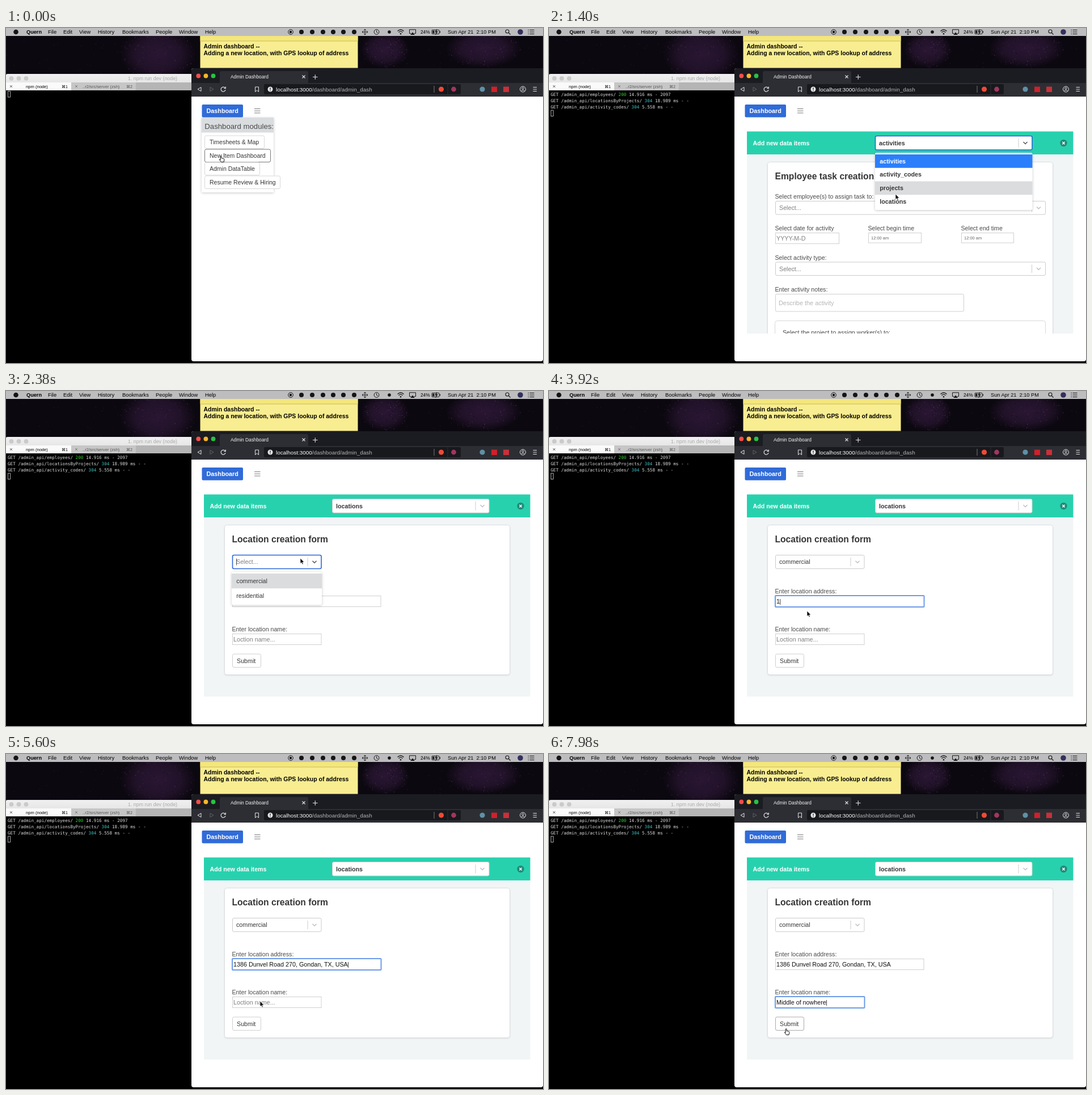
An HTML page for the animation above (8000 ms loop, 947x591 px).

```html
<!DOCTYPE html>
<html lang="en">
<head>
<meta charset="utf-8">
<title>Admin dashboard</title>
<style>
html, body { margin: 0; width: 100%; height: 100%; overflow: hidden; background: #000; }
svg { display: block; width: 947px; height: 591px; font-family: "Liberation Sans", Arial, sans-serif; }
.mono { font-family: "DejaVu Sans Mono", monospace; }
.b { font-weight: bold; }
.shade { filter: drop-shadow(0 1px 2px rgba(0,0,0,.22)); }
.soft { filter: drop-shadow(0 1px 1px rgba(0,0,0,.1)); }
</style>
</head>
<body>
<svg viewBox="0 0 947 591">
  <defs>
    <linearGradient id="bar" x2="0" y2="1"><stop stop-color="#f0f0f0"/><stop offset="1" stop-color="#dedede"/></linearGradient>
    <radialGradient id="haze"><stop stop-color="#2a1633"/><stop offset=".6" stop-color="#2a1633" stop-opacity=".7"/><stop offset="1" stop-color="#2a1633" stop-opacity="0"/></radialGradient>
    <clipPath id="sky"><path d="M0 14H947V71H621V82H0z"/></clipPath>
    <clipPath id="panel"><path d="M349 182H925V539H349z"/></clipPath>
  </defs>
  <g id="base"></g>
  <g id="live"></g>
</svg>
<script>
const STEP = 140, LOOP = 8000;
const INK = '#4a4a4a', DARK = '#363636', LINE = '#d3d3d3', BLUE = '#2a66d9';

const rect = (x, y, w, h, fill, more = '') =>
  `<rect x="${x}" y="${y}" width="${w}" height="${h}" fill="${fill}" ${more}/>`;
const text = (x, y, s, size = 10.65, fill = INK, cls = '') =>
  `<text x="${x}" y="${y}" font-size="${size}" fill="${fill}" class="${cls}">${s}</text>`;
const dot = (x, y, r, fill, more = '') => `<circle cx="${x}" cy="${y}" r="${r}" fill="${fill}" ${more}/>`;
const line = (d, color, w = 1, fill = 'none') => `<path d="${d}" fill="${fill}" stroke="${color}" stroke-width="${w}"/>`;
const frame = (x, y, w, h, stroke = LINE, r = 2.5, sw = 1) =>
  rect(x + .5, y + .5, w - 1, h - 1, '#fff', `rx="${r}" stroke="${stroke}" stroke-width="${sw}"`);

function sky() {
  let seed = 7;
  const rnd = () => (seed = seed * 16807 % 2147483647) / 2147483647;
  const clouds = [[268, 46, 66, 48], [668, 38, 42, 32], [842, 36, 66, 34]];
  let out = rect(0, 0, 947, 591, '#0c0810');
  for (const [x, y, w, h] of clouds)
    out += `<ellipse cx="${x}" cy="${y}" rx="${w}" ry="${h}" fill="url(#haze)"/>`;
  for (let i = 0; i < 480; i++) {
    const [cx, cy, w, h] = clouds[i % 3], a = rnd() * 6.283, d = Math.sqrt(rnd());
    const x = cx + Math.cos(a) * d * w, y = cy + Math.sin(a) * d * h;
    out += dot(x.toFixed(1), y.toFixed(1), (.4 + rnd() * .4).toFixed(2), ['#3d2248', '#2e193a', '#4c2f56', '#0e0812'][i % 4]);
  }
  for (let i = 0; i < 90; i++)
    out += dot((rnd() * 947).toFixed(1), (14 + rnd() * 68).toFixed(1), .5, '#33243d');
  return `<g clip-path="url(#sky)">${out}</g>`;
}

function menuBar() {
  const k = '#151515';
  let out = rect(0, 0, 947, 14, '#bdbdbf') + dot(17.5, 7, 4.3, k) + text(36, 10.4, 'Quern', 9.2, '#000', 'b');
  const items = { File: 74, Edit: 101, View: 129, History: 162, Bookmarks: 205, People: 264, Window: 305, Help: 351 };
  for (const name in items) out += text(items[name], 10.4, name, 9.4, '#000');
  out += dot(502, 7, 4.3, 'none', `stroke="${k}"`) + dot(502, 7, 2.2, k);
  for (const x of [521, 540, 559, 577, 595, 614, 676]) out += dot(x, 7, x == 676 ? 2.8 : 4, k);
  out += line('M633 2V12M628 7H638M631 4L633 2 635 4M631 10L633 12 635 10M630 5L628 7 630 9M636 5L638 7 636 9', k, .9);
  out += dot(653.5, 7, 4.4, 'none', `stroke="${k}"`) + line('M653.5 4V7.3L656 8.5', k, .9);
  out += line('M690.5 5.5Q696 .5 701.5 5.5M692.5 7.7Q696 4.5 699.5 7.7', k, 1.3) + dot(696, 10.2, 1.3, k);
  out += line('M714 9.5H711.5V2.8H722.5V9.5H720', k) + line('M717 7.5L721 12H713z', k, 0, k);
  out += text(731, 10.2, '24%', 8.3, '#000') + rect(751, 3.5, 13, 7, 'none', `rx="1" stroke="${k}" stroke-width=".9"`);
  out += rect(752.2, 4.7, 3.2, 4.6, k) + rect(764.8, 5.5, 1.2, 3, k) + line('M759.5 2L756.5 7.5H759L757.5 12 761.5 6H759z', k, .4, k);
  out += text(779, 10.4, 'Sun Apr 21\u00a0 2:10 PM', 9.2, '#000');
  out += dot(884, 6, 3, 'none', `stroke="${k}" stroke-width="1.1"`) + line('M886.3 8.3L889.5 11.5', k, 1.2);
  out += dot(907, 7, 4.8, '#34305c');
  return out + line('M920.5 3.5H922M920.5 7H922M920.5 10.5H922M923.5 3.5H931.5M923.5 7H931.5M923.5 10.5H931.5', k, 1.2);
}

const note = () => rect(342.5, 14, 278, 56.5, '#f8ed90') + rect(342.5, 14, 278, 9, '#f4e67a') + rect(342.5, 22.5, 278, 1, '#cabd62')
  + text(348.5, 36, 'Admin dashboard --', 10.47, '#000', 'b')
  + text(348.5, 48.3, 'Adding a new location, with GPS lookup of address', 10.47, '#000', 'b');

function terminal() {
  let out = rect(0, 110, 327, 481, '#000') + line('M0 110V83Q0 81 3 81H327V110z', 'none', 0, 'url(#bar)');
  for (const x of [9.5, 22.5, 35.5]) out += dot(x, 88.8, 3.9, '#cacaca');
  out += text(215, 92, '1. npm run dev (node)', 8.85, '#a9a9a9');
  out += rect(0, 96, 115, 14, '#fafafa') + rect(115, 96, 114, 14, '#c6c6c6') + rect(229, 96, 98, 14, '#b5b5b5');
  out += line('M7 101L11 105M11 101L7 105', '#555', .9) + line('M122 101L126 105M126 101L122 105', '#777', .9);
  return out + text(35, 105.6, 'npm (node)', 7.6, '#000') + text(98, 105.6, '⌘1', 7, '#000')
    + text(135, 105.6, '..r2/src/server (zsh)', 7.6, '#555') + text(212, 105.6, '⌘2', 7, '#555');
}

function browser() {
  const w = '#e4e4e6';
  let out = rect(327, 71, 620, 517, '#fff', 'rx="4"') + line('M327 121V75Q327 71 331 71H947V121z', 'none', 0, '#1b1c21');
  out += rect(327, 97, 620, 24, '#2d2e33') + line('M377 97V79Q377 76 380 76H530Q533 76 533 79V97z', 'none', 0, '#2d2e33');
  ['#fa4d48', '#f8b62c', '#27c440'].forEach((c, i) => out += dot(339.3 + i * 13.1, 84.5, 3.9, c));
  out += text(396, 89.4, 'Admin Dashboard', 8.35, '#f4f4f4');
  out += line('M522.5 83.5L527.5 88.5M527.5 83.5L522.5 88.5M541 86.5H549.5M545.25 82.25V90.75', w, 1.1);
  out += line('M344 104.5L338 108 344 111.5z', w, 1) + line('M360 104.5L366 108 360 111.5z', '#606167', 1);
  out += line('M386.3 105.7A4 4 0 1 0 387 109M387.3 103.5V106.5H384.3', w, 1.2);
  out += line('M439.5 104H445.5V112.5L442.5 110 439.5 112.5z', w, 1);
  out += rect(455, 99, 347, 18, '#18191d', 'rx="2"') + dot(466, 108, 4.5, w) + rect(465.4, 105.2, 1.2, 3.5, '#18191d') + rect(465.4, 109.7, 1.2, 1.2, '#18191d');
  out += text(476, 111.5, 'localhost:3000<tspan fill="#b4b5b8">/dashboard/admin_dash</tspan>', 9.9, '#fff');
  out += rect(754.5, 102, 1, 12, '#77787c') + rect(778.5, 99, 1, 18, '#2d2e33');
  out += dot(767.5, 108, 4.6, '#ef4a36') + dot(789.5, 108, 4.4, '#a1365f');
  out += dot(840, 108, 4.6, '#5f91a6') + rect(856, 103.5, 10, 9.5, '#d0202b') + rect(877, 103.5, 10, 9.5, '#c9303a');
  out += dot(911.5, 108, 5, 'none', `stroke="${w}"`) + dot(911.5, 106.6, 1.7, 'none', `stroke="${w}"`) + line('M908 111.5Q911.5 108 915 111.5', w);
  out += line('M929.5 104.5H936M929.5 108H936M929.5 111.5H936', w, 1.2);
  out += rect(345.5, 135, 72.5, 22.5, '#306bd8', 'rx="2"') + text(353.5, 150.3, 'Dashboard', 10.8, '#fff', 'b');
  return out + line('M438 142.5H448.5M438 146.2H448.5M438 149.9H448.5', '#777', 1);
}

function modules() {
  const items = [['Timesheets &amp; Map', 106], ['New Item Dashboard', 117], ['Admin DataTable', 98], ['Resume Review &amp; Hiring', 134]];
  let out = rect(345, 158, 127, 132, '#fff', 'class="shade"') + rect(345, 158, 127, 26.5, '#dadddf');
  out += text(350.3, 177.8, 'Dashboard modules:', 13.2);
  items.forEach(([s, w], i) => {
    const y = Math.round(190 + i * 23.7) - .5;
    out += frame(350, y, w, 23.5, i == 1 ? '#777' : '#d8d8d8') + text(359, y + 15.6, s, 10.5, DARK);
  });
  return out;
}

function select(x, y, w, h, label, { focus, color = DARK, cls = '', caret } = {}) {
  const cx = x + w - 12.5, cy = y + h / 2;
  let out = frame(x, y, w, h, focus ? BLUE : '#cbcbcb', 2.5, focus ? 1.6 : 1);
  out += text(x + 7, cy + 3.8, label, 10.7, color, cls) + rect(x + w - 25, y + 5, 1, h - 10, '#ccc');
  if (caret) out += rect(x + 7, cy - 6, .8, 12, '#222');
  return out + line(`M${cx - 3.5} ${cy - 1.7}l3.5 3.4 3.5-3.4`, focus ? '#555' : '#c0c0c0', 1.5);
}

function menu(x, y, w, rowH, items, hover, chosen, cls = '') {
  let out = rect(x, y, w, rowH * items.length + 6, '#fff', 'rx="2.5" class="shade"');
  items.forEach((s, i) => {
    const top = y + 3 + i * rowH, on = i === chosen;
    if (on || i === hover) out += rect(x, top, w, rowH, on ? '#2b7ffb' : '#dadcde');
    out += text(x + 8.3, top + rowH / 2 + 3.8, s, 10.7, on ? '#fff' : DARK, cls);
  });
  return out;
}

function input(x, y, w, h, value, { focus, color = '#111', size = 10.75, pad = 2 } = {}) {
  let out = focus ? rect(x, y, w, h, '#fff', 'rx="1" stroke="#6c9be8" stroke-width="2"') : frame(x, y, w, h, '#d0d0d0', 0);
  out += `<text x="${x + pad}" y="${y + h / 2 + size * .35}" font-size="${size}" fill="${color}">${value}`;
  return out + (focus ? '<tspan fill="#222" dx="-.8">|</tspan>' : '') + '</text>';
}

const card = h => rect(385.5, 236.5, 503, h, '#fff', 'rx="4" stroke="#dcdfe1" class="soft"');

function employeeForm() {
  const hint = { color: '#808080' }, small = { color: '#666', size: 7.5, pad: 5 };
  return card(400) + text(398.5, 267, 'Employee task creation form', 15.65, DARK, 'b')
    + text(398.5, 301, 'Select employee(s) to assign task to:') + select(399, 305, 477, 24.5, 'Select...', hint)
    + text(398.5, 357, 'Select date for activity') + text(562.5, 357, 'Select begin time') + text(726.5, 357, 'Select end time')
    + input(399, 361, 113, 20, 'YYYY-M-D', hint) + input(563, 361, 94, 18.5, '12:00 am', small) + input(727, 361, 93, 18.5, '12:00 am', small)
    + text(398.5, 408.5, 'Select activity type:') + select(399, 412.5, 477, 24.5, 'Select...', hint)
    + text(398.5, 465, 'Enter activity notes:') + frame(399, 469, 333, 31.5, '#cfcfcf', 2) + text(405, 488.6, 'Describe the activity', 10.9, '#b5b5b5')
    + frame(398, 516, 478, 90, '#d8d8d8', 4) + text(412, 540.5, 'Select the project to assign worker(s) to:');
}

const ADDRESSES = ['1386 Dunvel Road 270, Gondan, TX, USA', '1925 Dunvel Road 268, Gondan, TX, USA',
  '1170 Tall Willows Grove Road, Gondan, TX, USA', '1562 Flittering Field Road, Rio Telo, TX, USA', '184 Fable Hill Road, Mardon, TX, USA'];

function placeName(t) {
  if (t <= 6580) return 'Middle'.slice(0, Math.max(0, (t - 5880) / STEP + 1));
  return 'Middle' + ' of nowhere'.slice(0, Math.round(11 * (t - 6580) / (8 * STEP)));
}

function locationForm(t, y) {
  const chosen = t >= 2800, list = t >= 4200 && t < 5040, open = t >= 2240 && !chosen;
  const drop = list ? 79 : 0, name = placeName(t), naming = t >= 5740;
  let out = card(264 + drop) + text(398.5, 267, 'Location creation form', 15.65, DARK, 'b');
  out += select(399, 289, 157.5, 25, chosen ? 'commercial' : 'Select...',
    { focus: t >= 2240 && t < 3360, color: chosen ? DARK : '#808080', caret: open });
  out += text(398.5, 357, 'Enter location address:');
  out += input(399, 361, 262.5, 20, t >= 5040 ? ADDRESSES[0] : t >= 3780 ? '1' : '', { focus: t >= 3360 && t < 5740 });
  if (list) ADDRESSES.forEach((s, i) => out += text(398.5, 393 + i * 15.75, s));
  out += text(398.5, 424.3 + drop, 'Enter location name:');
  out += input(399, 428 + drop, 157.5, 20, name || (naming ? '' : 'Loction name...'), { focus: naming, color: name ? '#111' : '#808080' });
  out += frame(399, 463.5 + drop, 51, 24.5, t >= 7840 ? '#aaa' : '#d0d0d0') + text(407, 479.5 + drop, 'Submit', 10.7, DARK);
  if (open) out += menu(398, 319, 159, 26.2, ['commercial', 'residential'], Math.max(0, Math.floor((y - 322) / 26.2)));
  return out;
}

function panel(t, y) {
  const picked = t >= 1820, open = t >= 1120 && !picked;
  let out = rect(349, 223, 575.5, 316, '#f2f5f6') + (picked ? locationForm(t, y) : employeeForm());
  out += rect(349, 182.5, 575.5, 40.5, '#28d1ae') + text(359.5, 206.8, 'Add new data items', 10.65, '#fff', 'b');
  out += select(575, 190, 277.5, 25.5, picked ? 'locations' : 'activities', { focus: t >= 1120 && t < 2240, cls: 'b' });
  out += dot(907.5, 203, 6.2, '#208a78') + line('M905.3 200.8L909.7 205.2M909.7 200.8L905.3 205.2', '#fff', 1.5);
  if (open) out += menu(575, 220, 277.5, 23.75, ['activities', 'activity_codes', 'projects', 'locations'], Math.floor((y - 223) / 23.75), 0, 'b');
  return `<g clip-path="url(#panel)">${out}</g>`;
}

function log(t) {
  const rows = [['employees', '#2fd52f', 200, '14.916 ms - 2097'], ['locationsByProjects', '#3cc5c5', 304, '18.989 ms - -'], ['activity_codes', '#3cc5c5', 304, '5.558 ms - -']];
  const count = t < 560 ? 0 : t < 700 ? 1 : 3;
  let out = '';
  rows.slice(0, count).forEach(([path, color, code, rest], i) =>
    out += text(3, 120 + i * 11.2, `GET /admin_api/${path}/ <tspan fill="${color}">${code}</tspan> ${rest}`, 7.65, '#dcdcdc', 'mono'));
  return out + rect(3.5, 111.5 + count * 11.2, 4, 10.5, 'none', 'stroke="#bbb" stroke-width=".9"');
}

// time, x, y, pointer: 0 arrow, 1 hand, 2 hidden
const PATH = [[0, 381, 231, 1], [420, 381, 231, 0], [980, 690, 204, 0], [1120, 690, 204, 0], [1400, 611, 293, 0], [1540, 611, 302, 0],
  [1820, 611, 302, 0], [2240, 519, 295, 0], [2380, 519, 295, 0], [2660, 460, 334, 0], [2800, 460, 334, 0], [3220, 456, 370, 0],
  [3360, 456, 370, 0], [3640, 455, 388, 0], [4340, 455, 388, 1], [4620, 452, 397, 1], [5040, 452, 397, 0], [5180, 452, 397, 0],
  [5600, 448, 436, 0], [5880, 448, 436, 2], [7840, 432, 474, 1], [7980, 420, 490, 1]];

function pointer(t) {
  let i = PATH.length - 1;
  while (PATH[i][0] > t) i--;
  const a = PATH[i], b = PATH[i + 1] || a, u = (t - a[0]) / (b[0] - a[0] || 1), e = u * u * (3 - 2 * u);
  return { x: a[1] + (b[1] - a[1]) * e, y: a[2] + (b[2] - a[2]) * e, kind: a[3] };
}

function cursor({ x, y, kind }) {
  if (kind == 2) return '';
  const shape = kind
    ? line('M-2.8-4.8q1-1.2 2 0V-1.4l3.6.8q1.4.5 1.1 2L3 5.5H-1.4L-4.6 1.2q-.2-1.4 1.8.2z', '#111', 1, '#fff')
    : line('M0 0V9.5L2.2 7.6 3.7 11 5.3 10.3 3.8 7H6.8z', '#fff', .7, '#000');
  return `<g transform="translate(${x} ${y})">${shape}</g>`;
}

const base = document.getElementById('base'), live = document.getElementById('live');
base.innerHTML = sky() + menuBar() + note() + terminal() + browser();

let shown = -1;
function draw() {
  const t = Math.floor(performance.now() % LOOP / STEP) * STEP;
  if (t != shown) {
    const p = pointer(t);
    live.innerHTML = log(t) + (t < 420 ? modules() : panel(t, p.y)) + cursor(p);
    shown = t;
  }
  requestAnimationFrame(draw);
}
draw();
</script>
</body>
</html>
```
